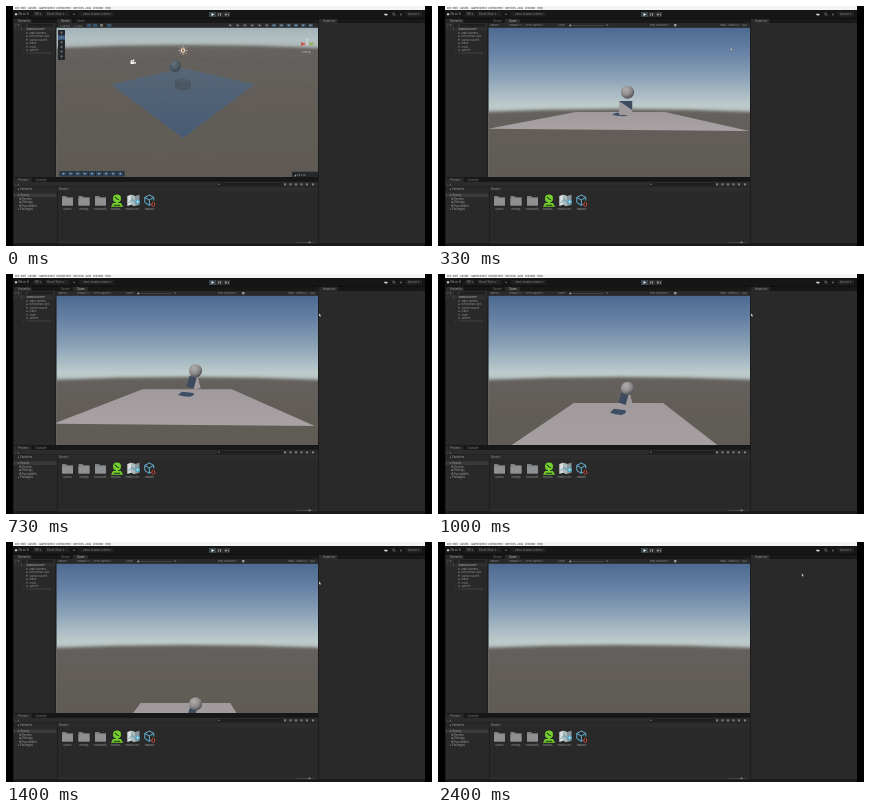
Recreate the animation shown at these times as an HTML page. Size 426 by 240 pixels, loop 2.47 s.

```html
<!DOCTYPE html>
<html lang="en">
<head>
<meta charset="utf-8">
<title>Editor play mode</title>
<style>
html, body { margin: 0; width: 100%; height: 100%; overflow: hidden; background: #000; }
svg { display: block; width: 100vw; height: 100vh; }
text { font-family: Inter, Roboto, sans-serif; }
</style>
</head>
<body>
<svg id="stage" viewBox="0 0 426 240" xmlns="http://www.w3.org/2000/svg">
  <defs>
    <linearGradient id="sky" gradientUnits="userSpaceOnUse" x1="0" y1="21" x2="0" y2="106">
      <stop offset="0" stop-color="#4d6990"/>
      <stop offset=".3" stop-color="#6782a4"/>
      <stop offset=".6" stop-color="#8ca3b7"/>
      <stop offset=".8" stop-color="#abbdc5"/>
      <stop offset=".92" stop-color="#bdcbcb"/>
      <stop offset="1" stop-color="#b4bfbd"/>
    </linearGradient>
    <linearGradient id="ground" x1="0" y1="0" x2="0" y2="1">
      <stop offset="0" stop-color="#65625e"/>
      <stop offset=".3" stop-color="#625d58"/>
      <stop offset="1" stop-color="#5f5953"/>
    </linearGradient>
    <linearGradient id="haze" gradientUnits="userSpaceOnUse" x1="0" y1="21" x2="0" y2="42">
      <stop offset="0" stop-color="#a0b2b9"/>
      <stop offset=".6" stop-color="#b3c0c1"/>
      <stop offset="1" stop-color="#a9b3b2"/>
    </linearGradient>
    <linearGradient id="sheet" x1="0" y1="0" x2="0" y2="1">
      <stop offset="0" stop-color="#566677"/>
      <stop offset="1" stop-color="#475b74"/>
    </linearGradient>
    <linearGradient id="floor" x1="0" y1="0" x2="0" y2="1">
      <stop offset="0" stop-color="#a19a9d"/>
      <stop offset="1" stop-color="#a9a2a4"/>
    </linearGradient>
    <radialGradient id="ball" cx=".38" cy=".3" r=".75">
      <stop offset="0" stop-color="#b2aeae"/>
      <stop offset=".55" stop-color="#8f8c8d"/>
      <stop offset="1" stop-color="#46484e"/>
    </radialGradient>
    <radialGradient id="ball2" cx=".4" cy=".3" r=".75">
      <stop offset="0" stop-color="#6a747c"/>
      <stop offset="1" stop-color="#38424c"/>
    </radialGradient>
    <filter id="soft" x="-10%" y="-10%" width="120%" height="120%"><feGaussianBlur stdDeviation="1.8"/></filter>
    <clipPath id="view"><rect x="50.5" y="21.5" width="261.5" height="149.5"/></clipPath>
  </defs>
  <g id="chrome"></g>
  <g id="scene" clip-path="url(#view)"></g>
  <g id="game" clip-path="url(#view)">
    <rect x="50" y="21" width="262" height="150" fill="url(#sky)"/>
    <path d="M30 106.5Q181 99.5 332 106.5V190H30Z" fill="url(#ground)" filter="url(#soft)"/>
    <path id="plane" fill="url(#floor)"/>
    <path id="shade" fill="#3c4d64"/>
    <path id="cube" fill="#a09a9d"/>
    <path id="dark" fill="#3d4b60"/>
    <circle id="sphere" r="6.6" fill="url(#ball)"/>
  </g>
  <g id="sceneBar"></g>
  <g id="gameBar"></g>
  <path id="cursor" d="M0 0V3L.7 2.4L1.2 3.4L1.7 3.1L1.3 2.1H2.2Z" fill="#fff" stroke="#222" stroke-width=".25"/>
</svg>
<script>
const $ = id => document.getElementById(id);
const rect = (x, y, w, h, fill, extra = '') =>
  `<rect x="${x}" y="${y}" width="${w}" height="${h}" fill="${fill}" ${extra}/>`;
const label = (x, y, s, fill = '#8c8c8c', size = 2.8, extra = '') =>
  `<text x="${x}" y="${y}" font-size="${size}" fill="${fill}" ${extra}>${s}</text>`;
const path = (d, fill, extra = '') => `<path d="${d}" fill="${fill}" ${extra}/>`;
const stroke = (d, color, width, extra = '') =>
  path(d, 'none', `stroke="${color}" stroke-width="${width}" ${extra}`);
const dot = (x, y, r, fill) => `<circle cx="${x}" cy="${y}" r="${r}" fill="${fill}"/>`;
const poly = pts => 'M' + pts.map(p => p.join(' ')).join('L') + 'Z';

function menuAndToolbar() {
  const items = [[9, 'File'], [15, 'Edit'], [22, 'Assets'], [33, 'GameObject'], [50, 'Component'],
    [67, 'Services'], [79, 'Jobs'], [87, 'Window'], [99, 'Help']];
  return rect(7, 0, 412, 4, '#f4f6f6') +
    items.map(([x, s]) => label(x, 3, s, '#333', 2.7)).join('') +
    rect(7, 4, 412, 8.5, '#161616') +
    dot(10, 8.3, 1.2, '#b8b8b8') + label(12.5, 9.3, 'Nirvo 6', '#aaa', 3) +
    rect(27, 6, 10, 4.5, '#222') + label(29, 9.2, 'NR ▾', '#888') +
    rect(39, 6, 24, 4.5, '#222') + label(41, 9.2, 'Asset Store ▾', '#888') +
    dot(68, 8.3, .8, '#777') + rect(73, 6, 35, 4.5, '#202020') +
    label(77.5, 9.2, 'Nirvo Version Control ▾', '#909090', 2.55) +
    rect(203, 6, 7, 5, '#38464e') + rect(210.4, 6, 6.6, 5, '#303030') + rect(217.4, 6, 6.6, 5, '#303030') +
    path('M205.5 7V10L208.3 8.5Z', '#e4edf0') +
    rect(212.3, 7.2, .8, 2.6, '#aaa') + rect(214.1, 7.2, .8, 2.6, '#aaa') +
    path('M219.2 7.2V9.8L221.5 8.5Z', '#aaa') + rect(222, 7.2, .6, 2.6, '#aaa') +
    dot(379.3, 8.6, 1, '#ddd') + dot(380.7, 8.6, .9, '#ddd') +
    `<circle cx="387.6" cy="8" r="1" fill="none" stroke="#999" stroke-width=".5"/>` +
    stroke('M388.3 8.7L389.4 9.8', '#999', .5) +
    dot(395, 8.4, 1, '#666') + rect(400, 6, 16, 4.5, '#222') + label(402, 9.2, 'Layout ▾', '#888');
}

function sidePanels() {
  const tree = ['Main Camera', 'Directional Light', 'Global Volume', 'Plane', 'Cube', 'Sphere'];
  return rect(7, 12.5, 412, 227.5, '#171717') +
    rect(7.5, 17, 42, 154, '#292929') + rect(7.5, 12.8, 18, 4.3, '#292929') +
    label(12, 16, 'Hierarchy', '#999') + label(46, 16, '⋮', '#777') +
    rect(7.5, 17, 42, 4.3, '#2d2d2d') + label(9, 20.2, '+ ▾', '#999') +
    rect(16, 17.8, 31, 2.7, '#1f1f1f') + label(19, 20, 'All', '#666', 2.4) +
    rect(7.5, 21.5, 42, 3.2, '#2e2e2e') + label(15, 24.1, '▾', '#888', 2.4) +
    label(20.5, 24.1, 'SampleScene*', '#bbb', 2.7) +
    tree.map((s, i) => dot(21, 27 + i * 3.42, .8, '#777') +
      label(23.5, 28 + i * 3.42, s, '#949494', 2.6)).join('') +
    label(17, 48.2, '▸', '#555', 2.4) + label(20.5, 48.3, 'DontDestroyOnLoad', '#505050', 2.6) +
    rect(312.6, 17, 106.4, 220.3, '#292929') + rect(312.6, 12.8, 19, 4.3, '#292929') +
    label(317, 16, 'Inspector', '#999') + label(415, 16, '⋮', '#777');
}

function folder(x) {
  return path(`M${x} 190H${x + 4}L${x + 5.2} 191.3H${x + 11}V199.5H${x}Z`, '#7d7f80') +
    rect(x, 192.2, 11, 7.3, '#8e9091');
}

function projectPanel() {
  const names = ['Scenes', 'Settings', 'TutorialInfo', 'InputSys…', 'ProjectOver…', 'Readme'];
  const tree = [[183.9, 12, '▸ Favorites'], [190.2, 12, '▾ Assets'], [193.8, 16, 'Scenes'],
    [197.2, 16, 'Settings'], [200.6, 16, 'TutorialInfo'], [204.1, 12, '▸ Packages']];
  return rect(7.5, 175.8, 304.5, 61.5, '#292929') + rect(7.5, 171.8, 18, 4.3, '#292929') +
    label(12.5, 175, 'Project', '#999') + label(29.5, 175, 'Console', '#858585') +
    label(308.5, 175, '⋮', '#777') +
    rect(7.5, 176, 304.5, 4.6, '#2c2c2c') + label(9, 179.5, '+ ▾', '#999') +
    rect(211, 177, 66, 2.8, '#1e1e1e') + dot(213, 178.3, .7, '#888') +
    [278, 283.5, 289, 294.5, 300, 306].map(x => rect(x, 177.4, 2, 2, '#808080')).join('') +
    rect(7.5, 180.6, 304.5, .4, '#1b1b1b') + rect(51, 180.8, .6, 56.5, '#181818') +
    rect(7.5, 187.5, 43, 3.4, '#3b3b3b') +
    tree.map(([y, x, s]) => label(x, y, s, '#a0a0a0', 2.8)).join('') +
    tree.slice(2, 5).map(([y]) => rect(13.3, y - 1.9, 2, 1.7, '#777')).join('') +
    rect(51.6, 181, 260.4, 4, '#2d2d2d') + label(53, 184.1, 'Assets', '#999') +
    folder(56) + folder(72.5) + folder(89) +
    // input actions
    dot(111, 192.4, 4, '#74d02c') + path('M105 200.8L107 197H115L117 200.8Z', '#74d02c') +
    rect(110, 195, 2, 3, '#74d02c') +
    stroke('M109 190.8Q110.5 193.5 113 193.8M107.8 199.2H114.2', '#20301a', 1.1) +
    // map
    path('M121.3 190L125 188.8L129 190V200L125 198.8L121.3 200Z', '#d8dedd') +
    path('M125 188.8L129 190V200L125 198.8Z', '#a9b8ba') +
    path('M129 190L133.5 188.8V198.8L129 200Z', '#8b9798') +
    stroke('M122.5 197L126 193.5L129 196', '#3f8fa4', .8) +
    dot(131.6, 195.8, 2.4, '#48a9c9') + dot(131.6, 195.8, 1, '#e4eeee') +
    // data cube
    stroke('M138.8 191.4L143.3 189L147.8 191.4V196.6L143.3 199.3L138.8 196.6ZM138.8 191.4L143.3 193.9L147.8 191.4M143.3 193.9V199.3',
      '#6ec3e6', .9) +
    rect(144.8, 194.5, 5.2, 6.3, '#292929') + label(144.8, 200, '{}', '#ec4a35', 5.4, 'font-weight="700"') +
    names.map((s, i) => label(61.5 + i * 16.4, 204, s, '#a0a0a0', 2.4, 'text-anchor="middle"')).join('') +
    rect(51.6, 235, 260.4, 2.6, '#2d2d2d') + rect(291, 236.2, 16, .4, '#666') + dot(303.5, 236.4, .9, '#999') +
    rect(7, 237.7, 412, 2.3, '#1b1919');
}

// Ground coordinates (plane side = 1) to the scene camera
function project(a, b) {
  const z = .0323 - .0112 * (a + b);
  return [177 + 1.51 * (a - b) / z, 31 + 1 / z];
}

function gridLines(from, to, step, end) {
  let d = '';
  for (let k = from; k <= to + .001; k += step) {
    const stop = end(k);
    d += `M${project(k, from).join(' ')}L${project(k, stop).join(' ')}`;
    d += `M${project(from, k).join(' ')}L${project(stop, k).join(' ')}`;
  }
  return d;
}

function sceneView() {
  let rays = '';
  for (let i = 0; i < 8; i++) {
    const c = Math.cos(i * Math.PI / 4), s = Math.sin(i * Math.PI / 4);
    rays += `M${177 + c * 2.8} ${44.5 + s * 2.8}L${177 + c * 4.5} ${44.5 + s * 4.5}`;
  }
  const corners = [project(0, 0), project(1, 0), project(1, 1), project(0, 1)];
  return rect(50, 21, 262, 150, 'url(#haze)') +
    path('M30 43Q181 35 332 43V190H30Z', 'url(#ground)', 'filter="url(#soft)"') +
    stroke(gridLines(-4, 4, .5, k => Math.min(4, 2.5 - k)), '#8a8a8a', .3, 'opacity=".16"') +
    path(poly(corners), 'url(#sheet)') +
    stroke(gridLines(0, 1, .1, () => 1), '#8194a8', .25, 'opacity=".14"') +
    path('M169 74L177 72L185 75V82L177 85L169 82Z', '#505d68') +
    path('M169 74L177 77L185 75V82L177 85L169 82Z', '#4a5763') +
    `<circle cx="169" cy="60" r="6" fill="url(#ball2)"/>` +
    stroke(rays, '#eee0c8', .7) +
    dot(177, 44.5, 2.2, '#f5e4cc') + dot(177, 44.5, 1.2, '#9a7554') +
    path('M124.5 55.8H128.2V58H124.5ZM128.2 56.5L129.8 55.8V58L128.2 57.3Z', '#f2f2f2') +
    dot(125.6, 54.9, 1, '#f2f2f2') + dot(127.4, 54.6, 1, '#eee') +
    path('M301 38L295 36V40Z', '#c95b4d') + path('M301 38L299.5 32.5H302.5Z', '#c8cfd0') +
    path('M301 38L307 36V40Z', '#91b35c') + dot(301, 38, 1.6, '#c9c9c9') +
    label(295, 46.7, '< Persp', '#d0d0d0', 2.6);
}

function tabs(scene) {
  return rect(50.5, 12.8, 261.5, 4.3, '#181818') +
    rect(scene ? 51 : 67, 12.8, 15, 4.3, '#2a2a2a') +
    label(55, 16, 'Scene', scene ? '#bbb' : '#777') + label(71, 16, 'Game', scene ? '#777' : '#bbb') +
    label(308.5, 16, '⋮', '#777') + rect(50.5, 17, 261.5, 4.5, '#292929');
}

function sceneControls() {
  let s = tabs(true) + rect(52, 24, 7, 30, '#25282b');
  for (let i = 0; i < 6; i++) {
    const y = 25.5 + i * 4.7;
    if (i === 1) s += rect(52, y - 1, 7, 4.6, '#3d5f83');
    s += stroke(`M55.5 ${y}V${y + 2.6}M54.2 ${y + 1.3}H56.8`, '#999', .5);
  }
  s += rect(53.5, 165, 65, 5.4, '#25282b');
  for (let i = 0; i < 9; i++) {
    const x = 54.5 + i * 7.1;
    s += rect(x, 165.5, 6, 4.3, '#2f4760') + dot(x + 3, 167.7, .9, '#92a8b8');
  }
  s += rect(286, 165.7, 26, 5.3, '#25282b') + label(288, 169.5, '◢  All  ▾  12', '#aaa', 2.7);
  s += label(54, 20.5, '▾ Center', '#888', 2.5) + label(68, 20.5, '▾ Local', '#888', 2.5);
  [81, 87, 101].forEach(x => { s += rect(x, 17.8, 4.5, 3, '#39546c'); });
  s += rect(94, 18, 3, 2.6, '#777');
  for (let i = 0; i < 12; i++) {
    const x = 222 + i * 7.3;
    s += rect(x, 17.8, 4.6, 3, i > 5 ? '#39546c' : '#393939') + dot(x + 2.3, 19.3, .8, '#aaa');
  }
  return s;
}

function gameControls() {
  return tabs(false) + [[52, 'Game ▾'], [71, 'Display 1 ▾'], [88, 'Free Aspect ▾'], [120, 'Scale'], [168, '1x'],
    [212, 'Play Focused ▾'], [282, 'Stats'], [290, 'Gizmos ▾']]
      .map(([x, s]) => label(x, 20.4, s, '#8c8c8c', 2.6)).join('') +
    rect(131, 19.2, 35, .4, '#606060') + dot(132.3, 19.4, .9, '#aaa') +
    rect(236, 18, 2.5, 2.4, '#999') + rect(304, 18, 5, 2.4, '#444');
}

// Piecewise linear lookup: rows are [time, value, value...]
function at(keys, t) {
  let i = 1;
  while (i < keys.length - 1 && t > keys[i][0]) i++;
  const a = keys[i - 1], b = keys[i];
  const k = Math.max(0, Math.min(1, (t - a[0]) / (b[0] - a[0])));
  return a.slice(1).map((v, j) => v + (b[j + 1] - v) * k);
}

const LOOP = 2470, STEP = 200 / 3, START = 66, HORIZON = 97;
const pointer = [[0, 190, 36], [330, 292.3, 41.7], [530, 313, 39.5],
  [1600, 313, 39.5], [1730, 342, 31.7], [1930, 346, 31.7], [2000, 346, 31.7], [2400, 363.8, 31.4]];
// sphere lift, cube lift, cube tilt
const bodies = [[70, -26.5, -6.5, 0], [330, -22.5, -6.5, 0], [430, -20.5, -7, 0], [730, -23.5, -11.5, 1],
  [1000, -23.4, -12.8, 1], [1200, -19.4, -8.5, 1], [1400, -17, -6, 1]];
const boxLit = [[-6.5, -7, -4, -7], [6.5, -7, 4, -6], [6.5, 7, 7, 5.5], [-6.5, 7, 0, 6.5]];
const boxDark = [[-6.5, -7, -4, -7], [6.5, -7, 3, -5], [6.5, 2, 0, 6], [0, -2.5, -7, 3.5]];
const shadow = [[-8, .2], [-4, -1], [7.5, -.5], [8, .3], [4, 1], [-3, .8]];

const morph = (pts, k, x, y) =>
  poly(pts.map(([ax, ay, bx, by]) => [x + ax + (bx - ax) * k, y + ay + (by - ay) * k]));

function set(id, attrs) {
  for (const k in attrs) $(id).setAttribute(k, attrs[k]);
}

function render(ms) {
  const t = Math.floor((ms % LOOP + 5) / STEP) * STEP;
  const playing = t >= START;
  $('scene').style.display = $('sceneBar').style.display = playing ? 'none' : '';
  $('game').style.display = $('gameBar').style.display = playing ? '' : 'none';

  // the floor falls freely and drifts a little to the left
  const u = Math.max(0, t / 1000 - .267);
  const far = 105.8 + 43 * u * u;
  const near = HORIZON + (far - HORIZON) * 2.95;
  const mid = HORIZON + (far - HORIZON) * 1.28;
  const [ballUp, boxUp, tilt] = at(bodies, t);
  set('plane', { d: poly([[138 - 3 * u, far], [227 - 2.5 * u, far], [311.5 - 6 * u, near + 1.5], [51 - 8 * u, near - .7]]) });
  const depth = 1.5 + u * 2.2;
  set('shade', { d: poly(shadow.map(([x, y]) => [182 - 2 * tilt + x, mid + y * depth])) });
  set('cube', { d: morph(boxLit, tilt, 187.7, mid + boxUp) });
  set('dark', { d: morph(boxDark, tilt, 187.7, mid + boxUp) });
  set('sphere', { cx: 189.5, cy: mid + ballUp });
  const [x, y] = at(pointer, t);
  set('cursor', { transform: `translate(${x} ${y})` });
}

$('chrome').innerHTML = menuAndToolbar() + sidePanels() + projectPanel();
$('scene').innerHTML = sceneView();
$('sceneBar').innerHTML = sceneControls();
$('gameBar').innerHTML = gameControls();

const begin = performance.now();
function tick() {
  render(performance.now() - begin);
  requestAnimationFrame(tick);
}
tick();
</script>
</body>
</html>
```
